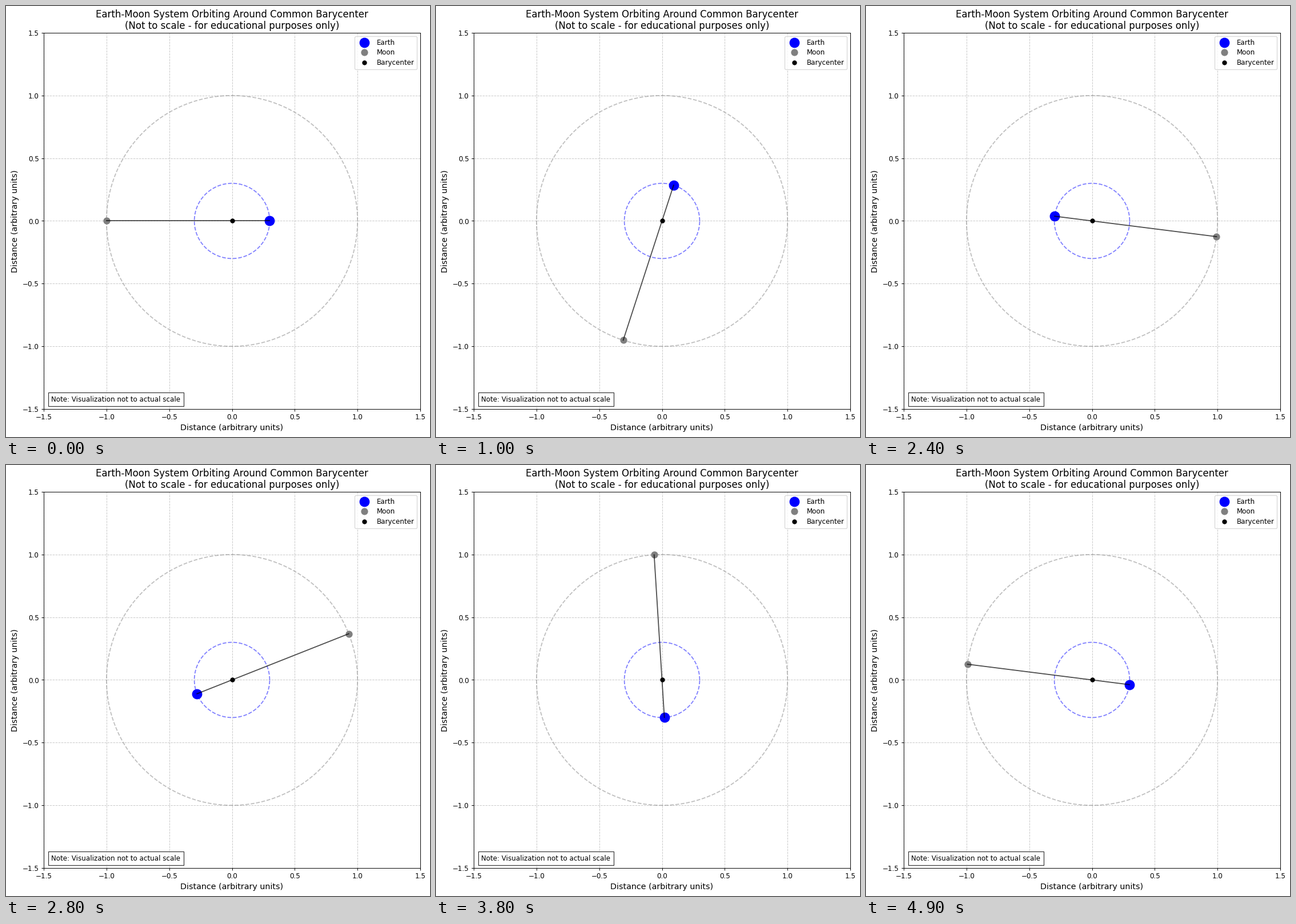
These frames come from a looping animation (742x755 px, 5000 ms). A matplotlib script:

```python
import numpy as np
import matplotlib.pyplot as plt
from matplotlib.animation import FuncAnimation

WIDTH, HEIGHT, DPI = 742, 755, 85.6
LEFT, BOTTOM, SIDE = 66, 49, 659
FRAMES, INTERVAL = 50, 100
EARTH_RADIUS, MOON_RADIUS = 0.3, 1.0

plt.rcParams["font.family"] = "DejaVu Sans"

# The tiny surplus keeps the pixel size from rounding down.
fig = plt.figure(figsize=((WIDTH + 0.001) / DPI, (HEIGHT + 0.001) / DPI), dpi=DPI)
ax = fig.add_axes([LEFT / WIDTH, BOTTOM / HEIGHT, SIDE / WIDTH, SIDE / HEIGHT])
ax.set(xlim=(-1.5, 1.5), ylim=(-1.5, 1.5))
ticks = np.arange(-1.5, 1.6, 0.5)
ax.set_xticks(ticks)
ax.set_yticks(ticks)
ax.grid(True, linestyle="--", alpha=0.7)
ax.set_title("Earth-Moon System Orbiting Around Common Barycenter\n"
             "(Not to scale - for educational purposes only)",
             fontsize=14, linespacing=1.15)
ax.set_xlabel("Distance (arbitrary units)", fontsize=12)
ax.set_ylabel("Distance (arbitrary units)", fontsize=12, labelpad=4.7)


def draw_orbit(radius, color):
    theta = np.linspace(0, 2 * np.pi, 200)
    ax.plot(radius * np.cos(theta), radius * np.sin(theta), "--",
            color=color, alpha=0.5)


def draw_body(label, color, size):
    return ax.plot([0], [0], "o", color=color, markersize=size, label=label)[0]


draw_orbit(EARTH_RADIUS, "blue")
draw_orbit(MOON_RADIUS, "gray")
earth = draw_body("Earth", "blue", 14)
moon = draw_body("Moon", "gray", 9.3)
draw_body("Barycenter", "black", 6)
link, = ax.plot([], [], "k-", alpha=0.7)

ax.legend(loc="upper right", labelspacing=0.4)
ax.text(0.02, 0.02, "Note: Visualization not to actual scale",
        transform=ax.transAxes, fontsize=10,
        bbox=dict(facecolor="white", alpha=0.8, pad=4.6))


def update(frame):
    angle = 2 * np.pi * frame / FRAMES
    direction = np.array([np.cos(angle), np.sin(angle)])
    earth_pos = EARTH_RADIUS * direction
    moon_pos = -MOON_RADIUS * direction
    earth.set_data(earth_pos[:1], earth_pos[1:])
    moon.set_data(moon_pos[:1], moon_pos[1:])
    link.set_data(*zip(earth_pos, moon_pos))
    return earth, moon, link


anim = FuncAnimation(fig, update, frames=FRAMES, interval=INTERVAL,
                     repeat=True, repeat_delay=0)
plt.show()
```
